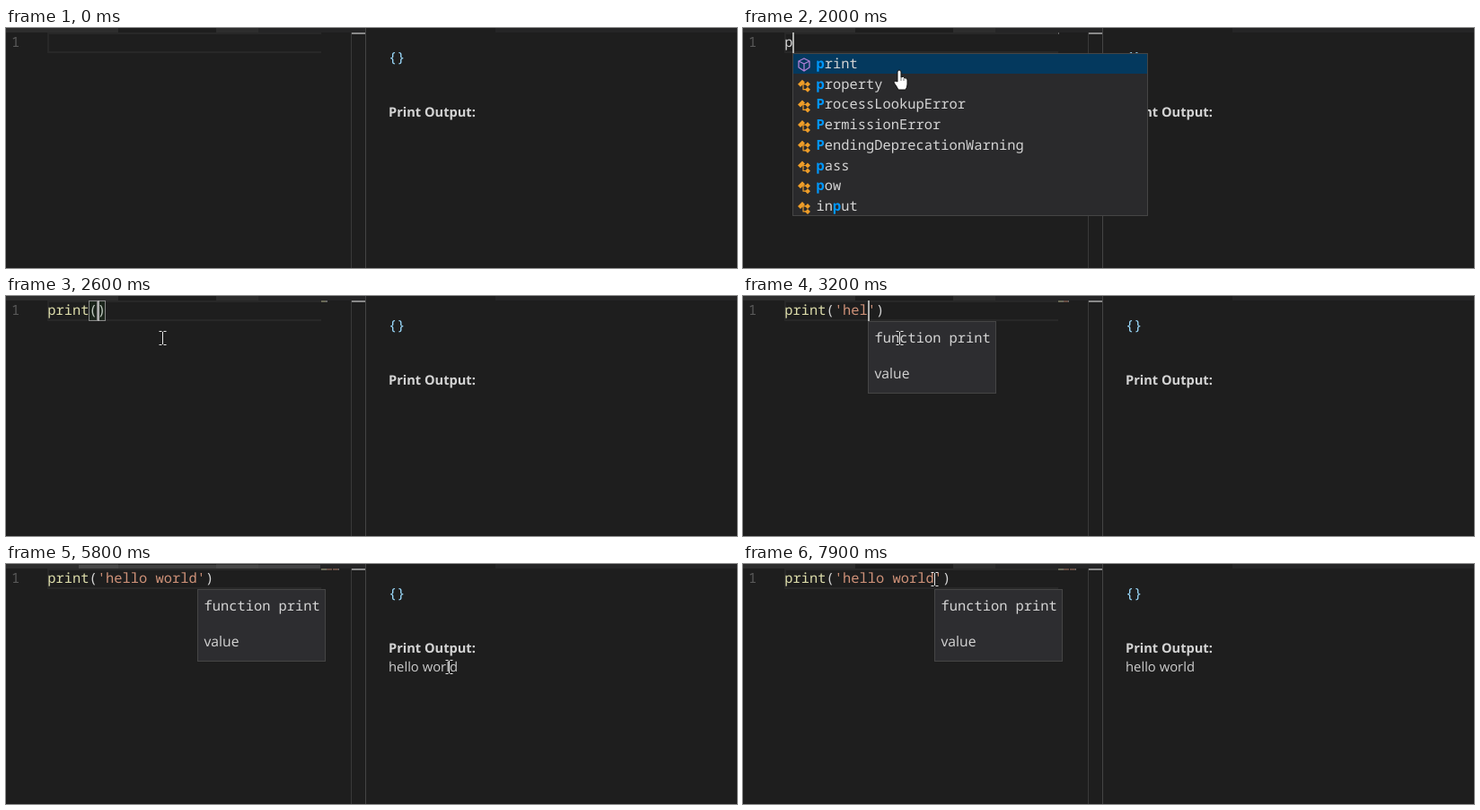
These frames come from a looping animation (814 by 268 pixels, 8000 ms). An HTML page with a canvas:

```html
<!DOCTYPE html>
<html lang="en">
<head>
<meta charset="utf-8">
<title>Live code preview</title>
<style>
  html, body { margin: 0; width: 100%; height: 100%; overflow: hidden; background: #1e1e1e; }
  canvas { display: block; }
</style>
</head>
<body>
<canvas id="stage" width="814" height="268"></canvas>
<script>
const ctx = document.getElementById('stage').getContext('2d');
ctx.textRendering = 'geometricPrecision';

const LOOP = 8000, CHAR = 9.25, CODE_X = 46, ROW = 22.7;
const MONO = '15.4px "Noto Sans Mono", monospace';
const SANS = '15.7px "Open Sans", sans-serif';
const OUTPUT = '14.8px "Open Sans", sans-serif';
const BOLD = 'bold 14.6px "Open Sans", sans-serif';
const LIGHT = '#d4d4d4', PANEL = '#2a2a2c', EDGE = '#454545';

const code = "print('hello world";
// [time, characters typed]
const strokes = [[2000, 1], [2200, 3], [2300, 4], [2400, 5], [2600, 6], [2800, 7], [2900, 8], [3100, 9],
  [3200, 10], [3400, 11], [3500, 12], [3600, 13], [3700, 14], [3800, 15], [3900, 16], [4000, 17], [4100, 18]];
const words = ['print', 'property', 'ProcessLookupError', 'PermissionError',
  'PendingDeprecationWarning', 'pass', 'pow', 'input'];
const docs = ['Prints the values to a stream, or to sys.stdout by', 'default. Optional keyword arguments: file: a file-',
  'like object (stream); defaults to the current', 'sys.stdout. sep: string inserted between values,',
  'default a space. end: string appended after the last', 'value, default a newline. flush: whether to forcibly',
  'flush the stream.'];
// [time, x, y]
const path = [[500, 140, 211], [800, 165, 90], [1100, 174, 47], [4900, 174, 47], [5200, 200, -20],
  [5400, 500, -10], [5500, 624, 70], [5600, 600, 118], [5800, 493, 115], [6000, 524, 123],
  [6200, 503, 116], [6700, 430, 114], [7100, 445, 113], [7200, 445, 113], [7700, 220, 18],
  [7800, 220, 18], [7900, 213, 17]];

function rect(x, y, w, h, color) {
  ctx.fillStyle = color;
  ctx.fillRect(x, y, w, h);
}

function box(x, y, w, h, fill, edge) {
  rect(x, y, w, h, fill);
  ctx.strokeStyle = edge;
  ctx.lineWidth = 1;
  ctx.strokeRect(x + .5, y + .5, w - 1, h - 1);
}

function text(str, x, y, font, color) {
  ctx.font = font;
  ctx.fillStyle = color;
  ctx.fillText(str, x, y);
}

function shape(d, x, y, fill, edge, width = 1) {
  const p = new Path2D(d);
  ctx.save();
  ctx.translate(x, y);
  ctx.lineWidth = width;
  ctx.lineJoin = 'round';
  if (fill) { ctx.fillStyle = fill; ctx.fill(p); }
  if (edge) { ctx.strokeStyle = edge; ctx.stroke(p); }
  ctx.restore();
}

const caretX = n => Math.round(CODE_X + n * CHAR);
const between = (t, a, b) => t >= a && t < b;

function mouseAt(t) {
  const next = path.findIndex(p => p[0] > t);
  if (next < 0) return path[path.length - 1].slice(1);
  const [t0, x0, y0] = path[next - 1], [t1, x1, y1] = path[next];
  const k = (t - t0) / (t1 - t0);
  return [x0 + (x1 - x0) * k, y0 + (y1 - y0) * k].map(Math.round);
}

// Indices of the query letters inside a word, or null
function match(word, query) {
  const hits = [];
  let from = 0;
  for (const c of query) {
    const i = word.toLowerCase().indexOf(c, from);
    if (i < 0) return null;
    hits.push(i);
    from = i + 1;
  }
  return hits;
}

function drawChrome(t) {
  rect(0, 0, 814, 268, '#1e1e1e');
  rect(0, 0, 125, 5, '#2d2d2d');
  rect(234, 0, 47, 5, '#2d2d2d');
  rect(281, 0, 119, 5, '#252526');
  rect(545, 0, 269, 5, '#252526');
  if (t >= 5100) {
    const fade = Math.max(0, Math.min(1, (7200 - t) / 1500));
    rect(81, 1, 269, 4, `rgba(121,121,121,${.4 * fade})`);
  }
  rect(46, 5, 305, 2, '#282828');
  rect(46, 26, 305, 2, '#282828');
  rect(46, 5, 2, 23, '#282828');
  rect(384, 5, 1, 263, '#393939');
  rect(400, 0, 1, 268, '#444');
  rect(385, 5, 15, 2, '#8a8a8a');
  text('1', 6, 21, MONO, '#5a5a5a');
}

function drawOutput(t, mouseX) {
  text('{}', 426, 38, MONO, '#9cdcfe');
  text('Print Output:', 426, 99, BOLD, LIGHT);
  if (between(t, 6200, 7000)) {
    const left = mouseX < 440 ? 426 : Math.min(503, mouseX);
    rect(left, 103, 503 - left, 22, '#264f78');
  }
  if (t >= 4400) text('hello world', 426, 120, OUTPUT, '#ccc');
}

function drawCode(n) {
  const line = code.slice(0, n) + (n > 6 ? "')" : n === 6 ? ')' : '');
  [...line].forEach((c, i) => {
    const color = i < 5 ? (n < 5 ? LIGHT : '#dcdcaa') : i > 5 && i < line.length - 1 ? '#ce9178' : LIGHT;
    text(c, CODE_X + .3 + i * CHAR, 21, MONO, color);
    if (c !== ' ') {
      ctx.globalAlpha = .4;
      rect(351 + i, 5, 1, 2, color);
      ctx.globalAlpha = 1;
    }
  });
  if (n === 6) {
    box(92, 5, 10, 23, 'rgba(0,100,0,.1)', '#888');
    box(101, 5, 10, 23, 'rgba(0,100,0,.1)', '#888');
  }
}

function drawIcon(isFunction, x, y) {
  if (isFunction) {
    shape('M0-7 6-4V3L0 7-6 3V-4ZM-6-4 0-1 6-4M0-1V7', x, y, null, '#b180d7', 1.3);
  } else {
    shape('M-2-6 1-3-4 2-7-1Z M4-4 7-1 4 2 1-1Z M4 2 7 5 4 8 1 5Z', x, y, '#ee9d28');
    shape('M-2-1H2M-1-1V5H2', x, y, null, '#ee9d28', 1.2);
  }
}

function drawSuggestions(n) {
  const x = caretX(n), query = code.slice(0, Math.max(1, n - 1));
  const items = words.map(word => ({ word, hits: match(word, query) })).filter(item => item.hits);
  box(x, 28, 396, Math.round(items.length * ROW), PANEL, EDGE);
  rect(x + 1, 29, 394, 22, '#04395e');
  items.forEach(({ word, hits }, row) => {
    const y = 45 + row * ROW;
    drawIcon(word === 'print', x + 13, y - 4);
    [...word].forEach((c, i) => {
      const hit = hits.includes(i);
      text(c, x + 26.5 + i * CHAR, y, (hit ? 'bold ' : '') + MONO, hit ? '#0097fb' : LIGHT);
    });
  });
  if (n < 3) return;
  box(x + 396, 28, 460, 260, PANEL, EDGE);
  text("print(value, ..., sep=' ', end='\\n', f", x + 403, 50, MONO, '#a0a0a0');
  text('ile=sys.stdout, flush=False)', x + 403, 72, MONO, '#a0a0a0');
  docs.forEach((line, i) => text(line, x + 403, 121 + i * 22, SANS, '#ccc'));
}

function drawSignature(n) {
  const x = caretX(n);
  box(x, 28, 143, 81, '#2d2d30', EDGE);
  text('function print', x + 7.5, 52, MONO, LIGHT);
  text('value', x + 7.5, 92, SANS, LIGHT);
}

function drawMouse(x, y, overList) {
  if (overList) {
    shape('M-2 2Q-2 0 0 0T2 2V8Q5 6 6 9 9 8 9 11V16Q9 19 7 22H-1Q-3 18-6 14-6 11-2 13Z', x, y, '#fff', '#111');
    shape('M2 8V12M5 9V12', x, y, null, '#555', .8);
  } else if (x > 401 && (y < 103 || y > 125 || x > 530)) {
    shape('M0 0V16L4 12 7 18 9 17 6 11H11Z', x, y, '#fff', '#111');
  } else {
    shape('M-3.5-7.5H-.5M1.5-7.5H4.5M.5-7V7M-3.5 7.5H-.5M1.5 7.5H4.5', x, y, null, '#e8e8e8');
  }
}

function draw(t) {
  const n = strokes.reduce((count, [at, chars]) => t >= at ? chars : count, 0);
  const listOpen = between(t, 2000, 2600);
  const caretOn = between(t, 1100, 1600) || between(t, 2000, 4500) || between(t, 5000, 5500);
  const mouse = t >= 500 ? mouseAt(t) : null;
  drawChrome(t);
  drawOutput(t, mouse && mouse[0]);
  drawCode(n);
  if (listOpen) drawSuggestions(n);
  if (t >= 2700) drawSignature(n);
  if (caretOn) rect(caretX(n), 5, 2, 23, '#aeafad');
  if (mouse) drawMouse(...mouse, listOpen);
}

function tick() {
  draw(Math.floor(performance.now() % LOOP / 100) * 100);
  requestAnimationFrame(tick);
}
tick();
</script>
</body>
</html>
```
